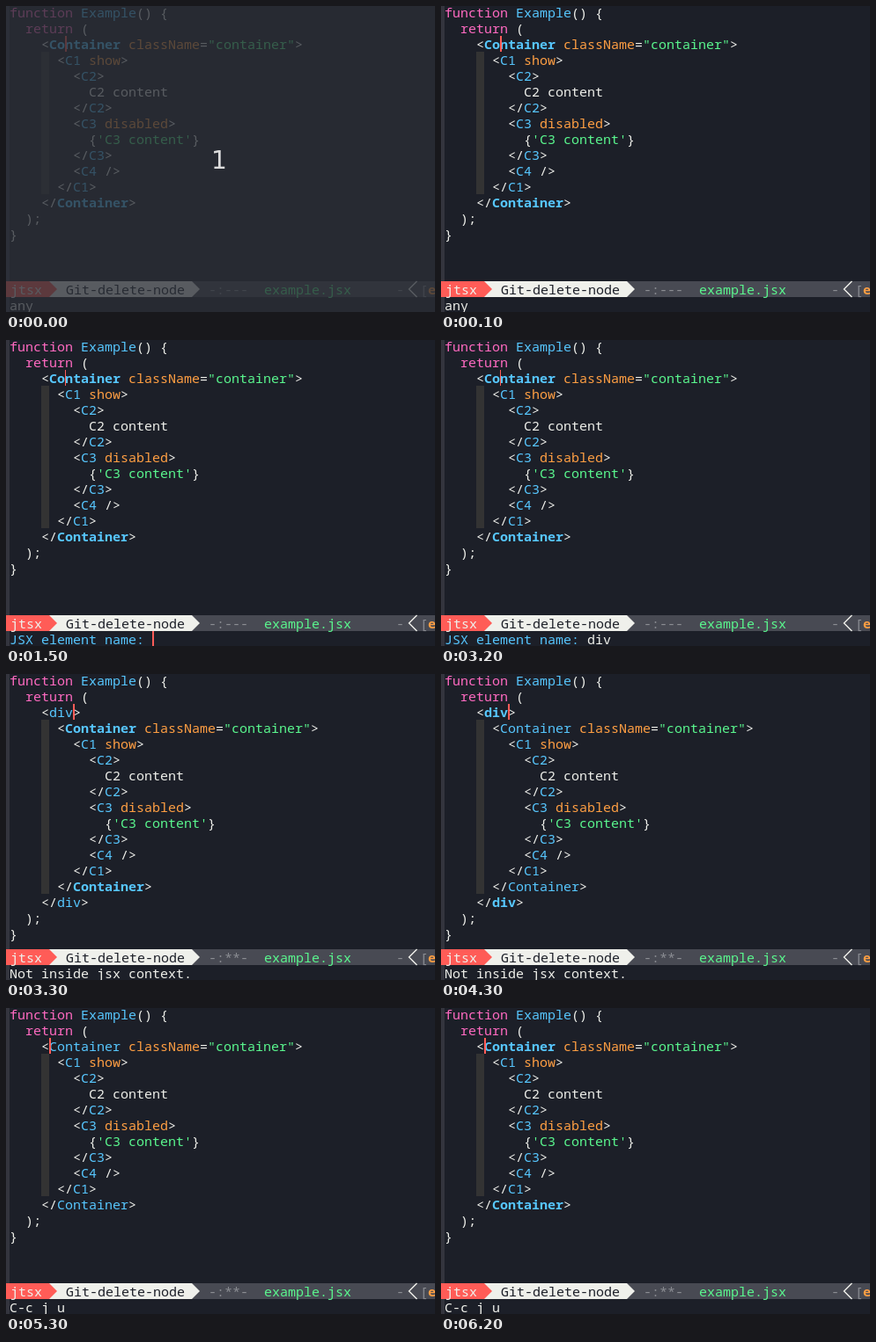
An HTML page with a canvas for the animation above (6.6 s loop, 487 px wide and 348 px high).

```html
<!DOCTYPE html>
<html lang="en">
<head>
<meta charset="utf-8">
<title>Wrapping a JSX element</title>
<style>
html, body { margin: 0; width: 100%; height: 100%; overflow: hidden; background: #1c1f28; }
canvas { display: block; }
</style>
</head>
<body>
<canvas id="stage" width="487" height="348"></canvas>
<script>
const ctx = document.getElementById('stage').getContext('2d');
const LOOP = 6600, CELL = 9, LEFT = 4, ROW = 18, BAR = 313, ECHO = 331;
const C = {
  bg: '#1c1f28', fringe: '#34353e', bar: '#484a53', guide: '#333333', fg: '#eff0eb',
  pink: '#ff6ac1', blue: '#57c7ff', green: '#5af78e', orange: '#ff9f43', red: '#ff5c57', grey: '#8b8d93'
};

const element = `    <Container className="container">
      <C1 show>
        <C2>
          C2 content
        </C2>
        <C3 disabled>
          {'C3 content'}
        </C3>
        <C4 />
      </C1>
    </Container>`.split('\n');
const component = body => ['function Example() {', '  return (', ...body, '  );', '}'];
const plain = component(element);
const wrapped = component(['    <div>', ...element.map(l => '  ' + l), '    </div>']);

const token = /(function|return)|("[^"]*"|'[^']*')|(className|show|disabled)|(Example|(?<=<\/?)\w+)/g;
const tokenColors = [C.pink, C.green, C.orange, C.blue];

// Each step holds the values that change at that time; cursor is its width
const steps = [
  [0, { code: plain, bold: 'Container', col: 7, cursor: 2, echo: 'any', prompt: '', mini: false, dirty: false, pending: false, dim: true }],
  [100, { dim: false }],
  [300, { cursor: 0 }],
  [700, { echo: '' }],
  [800, { cursor: 2 }],
  [1200, { echo: 'C-c j-' }],
  [1300, { cursor: 0 }],
  [1400, { echo: 'C-c j w' }],
  [1500, { prompt: 'JSX element name: ', echo: '', mini: true, cursor: 1 }],
  [1900, { mini: false }],
  [2200, { echo: 'd', mini: true }],
  [2500, { echo: 'di' }],
  [2700, { echo: 'div' }],
  [3200, { mini: false }],
  [3300, { code: wrapped, col: 8, cursor: 2, prompt: '', echo: 'Not inside jsx context.', dirty: true }],
  [3800, { cursor: 0 }],
  [3900, { bold: 'div', pending: true }],
  [4100, { pending: false }],
  [4300, { cursor: 2 }],
  [4500, { echo: '' }],
  [4700, { echo: 'C-c j-' }],
  [4800, { cursor: 0 }],
  [5200, { echo: 'C-c j u' }],
  [5300, { code: plain, bold: '', col: 5, cursor: 2 }],
  [5800, { bold: 'Container', cursor: 0 }],
  [6200, { cursor: 2 }]
];

function rect(color, x, y, w, h) {
  ctx.fillStyle = color;
  ctx.fillRect(x, y, w, h);
}

function text(str, x, top, color, bold) {
  ctx.font = (bold ? 'bold ' : '') + '15px "Noto Sans Mono", monospace';
  ctx.fillStyle = color;
  [...str].forEach((ch, i) => ctx.fillText(ch, x + i * CELL, top + 15));
}

function codeLine(line, top, bold) {
  const draw = (str, col, color, heavy) => text(str, LEFT + col * CELL, top, color, heavy);
  let end = 0;
  for (const m of line.matchAll(token)) {
    draw(line.slice(end, m.index), end, C.fg);
    const kind = m.slice(1).findIndex(Boolean);
    draw(m[0], m.index, tokenColors[kind], kind === 3 && m[0] === bold);
    end = m.index + m[0].length;
  }
  draw(line.slice(end), end, C.fg);
}

function segment(color, right) {
  ctx.fillStyle = color;
  ctx.beginPath();
  ctx.moveTo(0, BAR);
  ctx.lineTo(right, BAR);
  ctx.lineTo(right + 9, BAR + 9);
  ctx.lineTo(right, ECHO);
  ctx.lineTo(0, ECHO);
  ctx.fill();
}

function statusBar(s) {
  rect(C.bar, 0, BAR, 487, ROW);
  segment(C.fg, 211);
  segment(C.red, 49);
  text('jtsx', 5, BAR, C.fg);
  text('Git-delete-node', 68, BAR, C.bg);
  text(s.dirty ? '-:**-' : '-:---', 230, BAR, C.grey);
  text('example.jsx', 293, BAR, C.green);

  const x = s.pending ? 425 : 443;
  text('-', x, BAR, C.grey);
  ctx.strokeStyle = C.fg;
  ctx.lineWidth = 1.4;
  ctx.beginPath();
  ctx.moveTo(x + 23.5, BAR);
  ctx.lineTo(x + 14.5, BAR + 9);
  ctx.lineTo(x + 23.5, ECHO);
  ctx.stroke();
  text('[', x + 27, BAR, C.grey);
  text('eglot', x + 36, BAR, C.orange, true);
}

function countdown() {
  rect('rgba(42, 46, 54, 0.765)', 0, 0, 487, 348);
  ctx.font = '28px "DejaVu Sans", sans-serif';
  ctx.textAlign = 'center';
  ctx.fillStyle = '#dcdcdc';
  ctx.fillText('1', 242, 185);
  ctx.textAlign = 'left';
}

function draw(t) {
  const s = Object.assign({}, ...steps.filter(([at]) => at <= t).map(([, change]) => change));
  rect(C.bg, 0, 0, 487, 348);
  rect(C.fringe, 0, 0, LEFT, 348);
  rect(C.guide, 40, 52, CELL, (s.code.length - 6) * ROW);
  s.code.forEach((line, i) => codeLine(line, i * ROW - 2, s.bold));
  rect(C.red, LEFT + s.col * CELL, 34, s.cursor, ROW);

  statusBar(s);
  const input = LEFT + s.prompt.length * CELL;
  text(s.prompt, LEFT, ECHO, C.blue);
  text(s.echo, input, ECHO, C.fg);
  if (s.mini) rect(C.red, input + s.echo.length * CELL, ECHO, 2, ROW);
  if (s.dim) countdown();
}

const start = performance.now();
function tick() {
  draw((performance.now() - start) % LOOP);
  requestAnimationFrame(tick);
}
tick();
</script>
</body>
</html>
```
